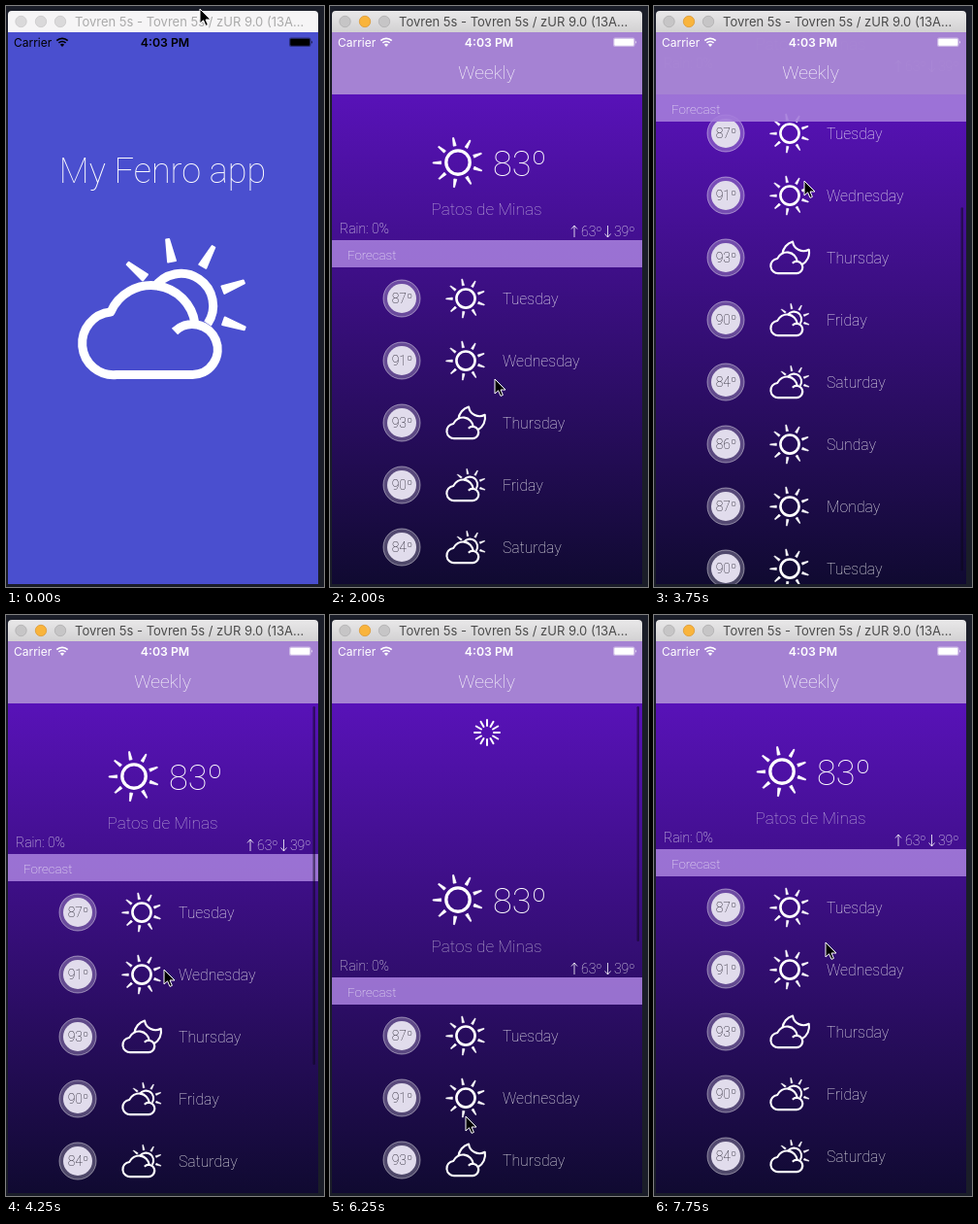
Animation of 328 by 598 pixels, one loop 8 s. Source, as an HTML page:

```html
<!DOCTYPE html>
<html lang="en">
<head>
<meta charset="utf-8">
<title>Weather app</title>
<style>
  html, body { margin: 0; width: 100%; height: 100%; overflow: hidden; background: #1a1d28; }
  svg { display: block; width: 100%; height: 100%; }
  text { font-family: Roboto, "Liberation Sans", sans-serif; font-weight: 250; fill: #fff; white-space: pre; }
  .ui { font-family: Inter, "Liberation Sans", sans-serif; font-weight: 400; }
  .line { fill: none; stroke: #fff; stroke-width: 9; stroke-linejoin: round; }
  .ray { fill: #fff; stroke: #fff; stroke-width: 2; stroke-linejoin: round; }
</style>
</head>
<body>
<svg viewBox="0 0 328 598">
  <defs>
    <linearGradient id="night" gradientUnits="userSpaceOnUse" x1="0" y1="91" x2="0" y2="595">
      <stop stop-color="#5812b8"/><stop offset="1" stop-color="#100a31"/>
    </linearGradient>
    <linearGradient id="chrome" x2="0" y2="1">
      <stop stop-color="#e9e8e9"/><stop offset="1" stop-color="#d2d1d2"/>
    </linearGradient>
    <clipPath id="screen"><path d="M2 27H322V595H2Z"/></clipPath>
    <g id="sun"><circle class="line" r="33"/></g>
    <path id="cloud" class="line" d="M174 335A26 26 0 1 1 192 379.500H114A32.300 32.300 0 0 1 108 315A45.600 45.600 0 0 1 195 327"/>
    <g id="partly">
      <use href="#cloud"/>
      <path class="line" d="M153 290A33 33 0 0 1 208 327"/>
      <g id="halfRays" transform="translate(180 309)"/>
    </g>
    <g id="moon">
      <use href="#cloud"/>
      <path class="line" d="M130 295A62 62 0 0 1 175 241A48 48 0 0 0 246 276A62 62 0 0 1 216 342"/>
    </g>
  </defs>

  <g clip-path="url(#screen)">
    <rect x="2" y="27" width="320" height="568" fill="url(#night)"/>
    <g id="spinner" transform="translate(162 121)" stroke="#fff" stroke-width="2" stroke-linecap="round"/>
    <g id="content">
      <use href="#sun" transform="translate(132 161) scale(.37)"/>
      <text id="degrees" x="168" y="175" font-size="36"></text>
      <text x="161.5" y="215" font-size="17.200" text-anchor="middle" opacity=".65">Patos de Minas</text>
      <text id="rain" x="10" y="234" font-size="14" opacity=".9"></text>
      <path d="M252 238V226M249 229.500L252 226L255 229.500M286.500 226V238M283.500 234.500L286.500 238L289.500 234.500" fill="none" stroke="#fff" stroke-width=".8"/>
      <text x="259" y="237" font-size="14" opacity=".9">63º</text>
      <text x="314.500" y="237" font-size="14" text-anchor="end" opacity=".9">39º</text>
      <g id="rows"></g>
    </g>
    <g id="section">
      <rect x="2" width="320" height="28" fill="#a57ddb" opacity=".9"/>
      <text x="18" y="20" font-size="13.300" opacity=".9">Forecast</text>
    </g>
    <rect id="scrollbar" x="316.500" width="2.500" rx="1.250" fill="#0b0618" opacity=".5"/>
    <rect x="2" y="27" width="320" height="64" fill="#a886d4" opacity=".97"/>
    <text x="161.500" y="75" font-size="19.200" text-anchor="middle">Weekly</text>
    <g id="splash">
      <rect x="2" y="27" width="320" height="568" fill="#4a4fcf"/>
      <text x="161.500" y="182" font-size="36" text-anchor="middle">My Fenro app</text>
      <use href="#partly"/>
    </g>
    <g id="status">
      <text class="ui" x="8" y="41.500" font-size="12" style="fill:inherit">Carrier</text>
      <path id="wifi" d="M52.300 35.700A8.300 8.300 0 0 1 63.700 35.700M54.400 38A5.200 5.200 0 0 1 61.600 38" style="fill:none" stroke-width="1.700"/>
      <path d="M58 42L55.900 39.700A3 3 0 0 1 60.100 39.700Z"/>
      <text class="ui" x="164" y="41.500" font-size="12.300" text-anchor="middle" style="fill:inherit;font-weight:600">4:03 PM</text>
      <rect x="292" y="32.500" width="22.500" height="9.500" rx="2" opacity=".4"/>
      <rect x="293.300" y="33.800" width="20" height="7" rx="1"/>
      <path d="M315.300 35.500Q317 37.200 315.300 39Z"/>
    </g>
  </g>

  <path id="bar" d="M2 27V9Q2 5 6 5H318Q322 5 322 9V27Z"/>
  <g id="lights" stroke-width=".8">
    <circle cx="15.500" cy="16" r="5.700"/><circle cx="36" cy="16" r="5.700"/><circle cx="56" cy="16" r="5.700"/>
  </g>
  <text id="title" class="ui" x="71" y="21" font-size="13">Tovren 5s - Tovren 5s / zUR 9.0 (13A…</text>
  <path id="cursor" d="M0 0V15L3.600 11.800L6 17.400L8.400 16.400L6 11H11Z" stroke="#fff" stroke-width="1"/>
</svg>

<script>
const LOOP = 8000, STEP = 250, MAX_SCROLL = 186;
const $ = id => document.getElementById(id);
const clamp = (v, lo, hi) => Math.min(hi, Math.max(lo, v));
const set = (el, attrs) => { for (const k in attrs) el.setAttribute(k, attrs[k]); };

// [time, scroll offset]
const scrollKeys = [
  [0, 0], [2000, 0], [2250, 14], [2500, 84], [2750, 174], [3000, 218], [3250, 196],
  [3500, 186], [3750, 170], [4000, 78], [4250, -5], [4500, 0], [5000, 0], [5250, -64],
  [5500, -105], [5750, -130], [6000, -130], [6250, -132], [6500, -88], [6750, -60],
  [7000, -60], [7250, 0]
];
// [time, x, y]
const cursorKeys = [
  [0, 200, 3], [1000, 200, 3], [1500, 188, 180], [2000, 170, 384], [2500, 164, 300],
  [3000, 156, 140], [3500, 153, 150], [3750, 155, 180], [4000, 160, 285], [4250, 163, 365],
  [5000, 152, 226], [5250, 154, 357], [5500, 147, 455], [5750, 141, 514], [6000, 141, 514],
  [6250, 140, 516], [7250, 137, 528], [7500, 152, 440], [7750, 177, 337]
];

function sample(keys, t) {
  const next = keys.findIndex(k => k[0] > t);
  if (next < 0) return keys[keys.length - 1].slice(1);
  const a = keys[next - 1], b = keys[next], p = (t - a[0]) / (b[0] - a[0]);
  return a.slice(1).map((v, i) => v + (b[i + 1] - v) * p);
}

const ray = k => `<path class="ray" d="M47 -4L70 -1.500V1.500L47 4Z" transform="rotate(${19 + 40 * k})"/>`;
$('sun').innerHTML += [...Array(9).keys()].map(ray).join('');
$('halfRays').innerHTML = [0, 5, 6, 7, 8].map(ray).join('');

const forecast = [
  [87, 'Tuesday', 'sun'], [91, 'Wednesday', 'sun'], [93, 'Thursday', 'moon'], [90, 'Friday', 'partly'],
  [84, 'Saturday', 'partly'], [86, 'Sunday', 'sun'], [87, 'Monday', 'sun'], [90, 'Tuesday', 'sun']
];
$('rows').innerHTML = forecast.map(([temp, day, icon], i) => {
  const place = icon === 'sun' ? 'translate(140 0) scale(.29)' : 'translate(140 0) scale(.235) translate(-162 -311)';
  return `<g transform="translate(0 ${301 + 64 * i})">
    <circle cx="74" r="19" fill="#fff" fill-opacity=".25" stroke="#fff" stroke-opacity=".45"/>
    <circle cx="74" r="15" fill="#e1dcec"/>
    <text x="74.500" y="5" font-size="14" text-anchor="middle" style="fill:#1c1925">${temp}º</text>
    <use href="#${icon}" transform="${place}"/>
    <text x="178" y="6" font-size="15.800" opacity=".92">${day}</text>
  </g>`;
}).join('');
$('spinner').innerHTML = [...Array(12).keys()]
  .map(i => `<path d="M0 -7V-13" transform="rotate(${30 * i})"/>`).join('');

function drawSpinner(t, scroll) {
  const refreshing = t >= 6250 && t < 7250;
  const shown = refreshing ? 12 : clamp(Math.round((-scroll - 30) / 5), 0, 12);
  const lead = (t - 6250) / STEP * 3;
  [...$('spinner').children].forEach((spoke, i) => {
    const fade = t > 6250 ? 1 - ((lead - i + 24) % 12) / 16 : 1;
    set(spoke, { opacity: i < shown ? fade : 0 });
  });
}

function drawScrollbar(t, scroll) {
  const inside = clamp(scroll, 0, MAX_SCROLL);
  const height = 374 - Math.abs(scroll - inside);
  const y = 94 + inside / MAX_SCROLL * (498 - height);
  const visible = t >= 2250 && t <= 7250;
  set($('scrollbar'), { y, height, visibility: visible ? 'visible' : 'hidden' });
}

function drawWindow(active) {
  set($('bar'), { fill: active ? 'url(#chrome)' : '#f6f5f6' });
  $('title').style.fill = active ? '#4b4b4b' : '#aaa';
  [...$('lights').children].forEach((light, i) => {
    const amber = active && i === 1;
    set(light, {
      fill: amber ? '#f9b43c' : active ? '#c6c5c6' : '#dad9da',
      stroke: amber ? '#dc9a35' : active ? '#b0afb0' : '#c9c8c9'
    });
  });
}

function draw(t) {
  const [scroll] = sample(scrollKeys, t);
  const [x, y] = sample(cursorKeys, t);
  const loaded = t >= 1000;
  const ink = t < 500 ? '#000' : '#fff';

  set($('content'), { transform: `translate(0 ${-scroll})` });
  set($('section'), { transform: `translate(0 ${Math.max(91, 241 - scroll)})` });
  set($('rows'), { visibility: loaded ? 'visible' : 'hidden' });
  $('degrees').textContent = loaded ? '83º' : '72º';
  $('rain').textContent = loaded ? 'Rain: 0%' : '0%';
  set($('splash'), { opacity: t < 500 ? 1 : t < 750 ? 0.35 : 0 });
  set($('status'), { fill: ink });
  set($('wifi'), { stroke: ink });
  set($('cursor'), { transform: `translate(${x} ${y})` });
  drawSpinner(t, scroll);
  drawScrollbar(t, scroll);
  drawWindow(t >= 2000);
}

function frame() {
  const t = performance.now() % LOOP;
  draw(Math.floor(t / STEP) * STEP);
  requestAnimationFrame(frame);
}
frame();
</script>
</body>
</html>
```
